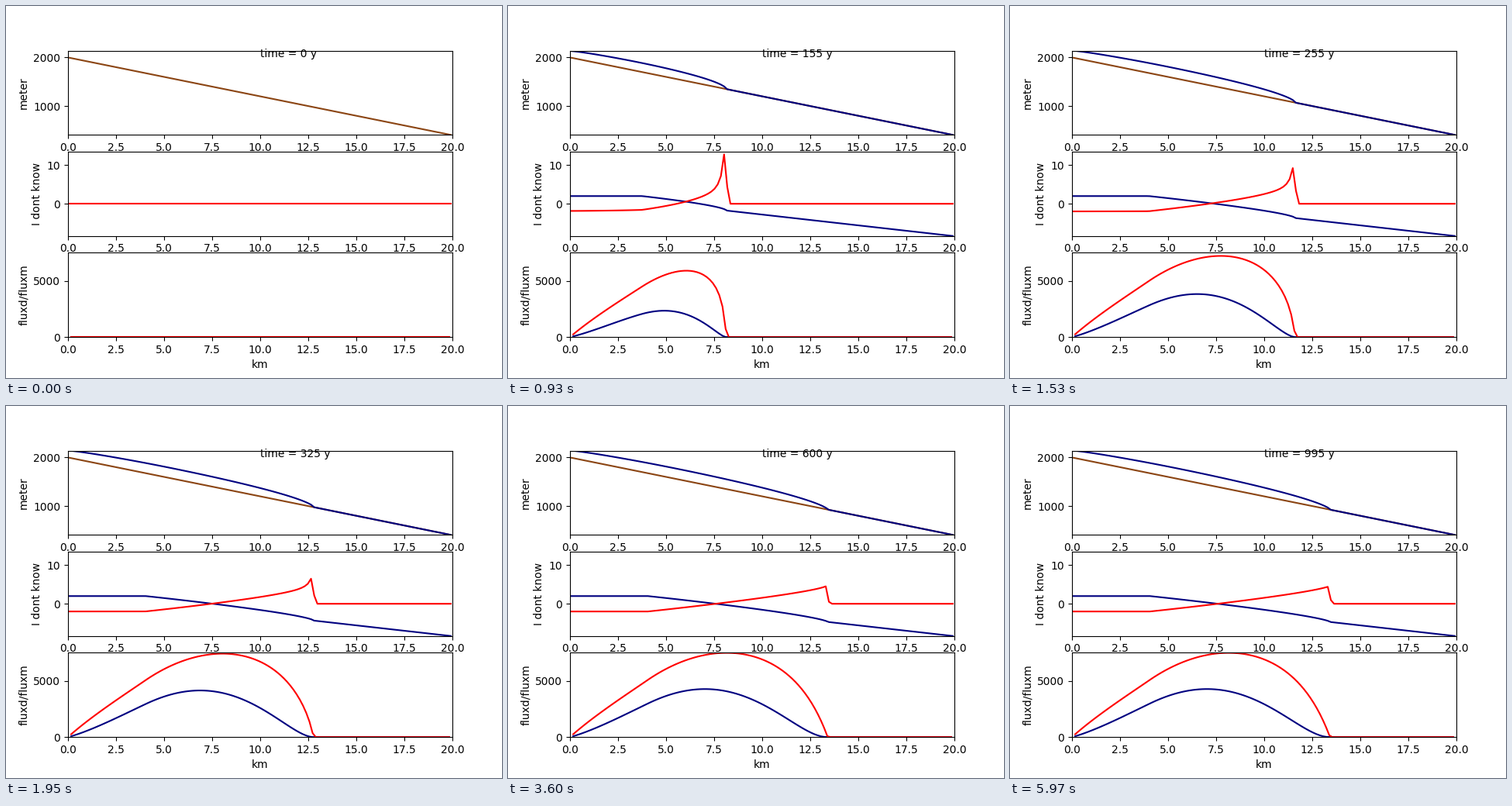
Write a matplotlib script that moves like this. It is 640 by 480 pixels and loops after 6 s.

```python
import numpy as np
import matplotlib.pyplot as plt
from matplotlib.animation import FuncAnimation

# Glacier flowing down a linear slope: deformation plus sliding
LENGTH = 20000.0
CELLS = 121
DX = LENGTH / CELLS
DT = 0.02
YEARS = 5
FRAMES = 200

YEAR = 365.25 * 24 * 3600
STRESS = (917 * 9.81) ** 3
DEFORM = 0.4 * 1.9e-24 * YEAR * STRESS
SLIDE = 5.7e-20 * YEAR * STRESS

ELA = 1600.0
GRADIENT = 0.007
MAX_BALANCE = 2.0

x = (np.arange(CELLS) + 0.5) * DX
edges = np.arange(1, CELLS) * DX
bed = 2000 - 0.08 * x


def simulate():
    """Return (surface, balance, convergence, deformation, sliding) per frame."""
    ice = np.zeros(CELLS)
    flux = np.zeros(CELLS + 1)
    nothing = np.full(CELLS, np.nan)
    zero = np.zeros(CELLS - 1)
    states = [(nothing, nothing, np.zeros(CELLS), zero, zero)]
    for _ in range(FRAMES - 1):
        for _ in range(round(YEARS / DT)):
            surf = bed + ice
            slope = (surf[:-1] - surf[1:]) / DX
            mid = 0.5 * (ice[:-1] + ice[1:])
            drive = mid * slope
            drive = drive * drive * drive
            deform = DEFORM * mid * mid * drive
            slide = SLIDE * drive
            flux[1:-1] = deform + slide
            gain = (flux[:-1] - flux[1:]) / DX
            balance = np.minimum(GRADIENT * (surf - ELA), MAX_BALANCE)
            ice = np.maximum(ice + DT * (balance + gain), 0)
        states.append((bed + ice, balance, gain, deform, slide))
    return states


states = simulate()
top = max(s[0].max() for s in states[1:])
most_flux = max(s[4].max() for s in states)

fig, (ax_z, ax_b, ax_q) = plt.subplots(3, 1, figsize=(6.4, 4.8), dpi=100)

ax_z.plot(x / 1000, bed, color="saddlebrown")
surface, = ax_z.plot([], [], color="navy")
balance, = ax_b.plot([], [], color="navy")
gain, = ax_b.plot([], [], color="red")
deform, = ax_q.plot([], [], color="navy")
slide, = ax_q.plot([], [], color="red")
lines = (surface, balance, gain, deform, slide)
clock = ax_z.text(10, 2000, "")

ax_z.set_ylim(bed.min(), top)
ax_b.set_ylim(GRADIENT * (bed.min() - ELA), 13.5)
ax_q.set_ylim(0, most_flux)
for ax, label in ((ax_z, "meter"), (ax_b, "I dont know"), (ax_q, "fluxd/fluxm")):
    ax.set_xlim(0, 20)
    ax.set_ylabel(label)
ax_q.set_xlabel("km")


def update(i):
    for line, values in zip(lines, states[i]):
        pos = x if len(values) == CELLS else edges
        line.set_data(pos / 1000, values)
    clock.set_text(f"time = {i * YEARS} y")
    return (*lines, clock)


anim = FuncAnimation(fig, update, frames=FRAMES, init_func=lambda: update(0),
                     interval=30, repeat=True, repeat_delay=0)
plt.show()
```
